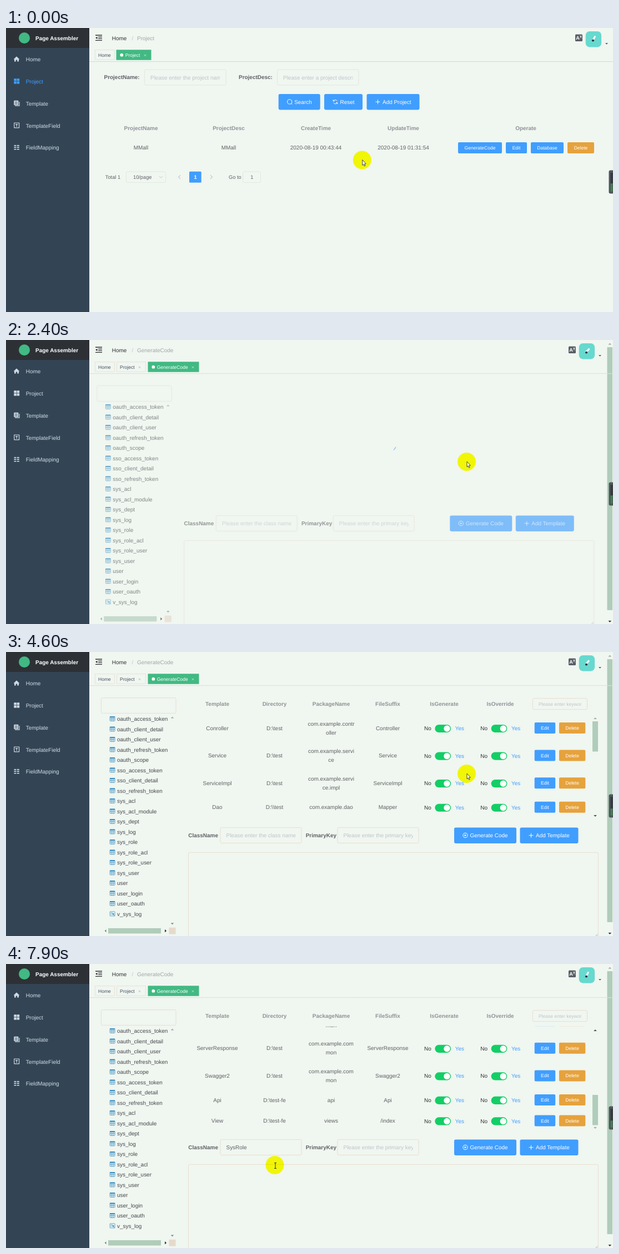
An HTML page with a canvas that plays this animation: 1093 px wide and 512 px high, repeating every 8000 ms.

```html
<!DOCTYPE html>
<html lang="en">
<head>
<meta charset="utf-8">
<title>Project admin</title>
<style>
html, body { margin: 0; width: 100%; height: 100%; overflow: hidden; background: #f0f6f0; }
canvas { display: block; width: 1093px; height: 512px; }
</style>
</head>
<body>
<canvas id="stage" width="1093" height="512"></canvas>
<script>
const ctx = document.getElementById('stage').getContext('2d');
ctx.textRendering = 'geometricPrecision';
const LOOP = 8000, LEAVE = 1715, SWAP = 2215, LOADED = 3740, PICKED = 7100;
const BG = '#f0f6f0', BLUE = '#409eff', GREEN = '#42b983', ORANGE = '#e6a23c';
const DARK = '#303133', TEXT = '#606266', MUTED = '#909399', HINT = '#c0c4cc';
const THUMB = '#b0ccba', SAND = '#e6dacb';
const SCROLL_MAX = 383.2, NOTCH = 71.16;
const NOTCH_TIMES = [4800, 5050, 5450, 5600, 5750, 5900];
const TABLES = ('oauth_access_token oauth_client_detail oauth_client_user oauth_refresh_token ' +
  'oauth_scope sso_access_token sso_client_detail sso_refresh_token sys_acl sys_acl_module ' +
  'sys_dept sys_log sys_role sys_role_acl sys_role_user sys_user user user_login user_oauth ' +
  'v_sys_log').split(' ');
const ROWS = [
  ['Conroller', 'D:\\test', 'com.example.contr|oller', 'Controller'],
  ['Service', 'D:\\test', 'com.example.servi|ce', 'Service'],
  ['ServiceImpl', 'D:\\test', 'com.example.servi|ce.impl', 'ServiceImpl'],
  ['Dao', 'D:\\\\test', 'com.example.dao', 'Mapper'],
  ['Mapper', 'D:\\test', 'mappers', 'Mapper'],
  ['Pojo', 'D:\\test', 'com.example.pojo', 'Pojo'],
  ['PojoDTO', 'D:\\test', 'com.example.dto', 'DTO'],
  ['ExceptionResolver', 'D:\\test', 'com.example.com|mon', 'ExceptionResolver'],
  ['ResponseCode', 'D:\\test', 'com.example.com|mon', 'ResponseCode'],
  ['ServerResponse', 'D:\\test', 'com.example.com|mon', 'ServerResponse'],
  ['Swagger2', 'D:\\test', 'com.example.com|mon', 'Swagger2'],
  ['Api', 'D:\\test-fe', 'api', 'Api'],
  ['View', 'D:\\test-fe', 'views', '/index']
];
const COLUMNS = [380.5, 483.5, 585.5, 687.5];
const PATH = [
  [0, 641.3, 238], [300, 641.3, 238], [1400, 829.5, 219.4], [6100, 829.5, 219.4], [6500, 488.4, 281.3],
  [6900, 236, 341], [7300, 236, 341], [7800, 484, 362.5], [8000, 484, 362.5]
];

const clamp = (v, lo = 0, hi = 1) => Math.min(hi, Math.max(lo, v));
const mix = (a, b, p) => a + (b - a) * p;
const smooth = p => p * p * (3 - 2 * p);

// CSS "ease": cubic-bezier(.25, .1, .25, 1)
function ease(p) {
  p = clamp(p);
  let lo = 0, hi = 1;
  for (let i = 0; i < 20; i++) {
    const u = (lo + hi) / 2;
    const x = 0.75 * u * (1 - u) + u ** 3;
    if (x < p) lo = u; else hi = u;
  }
  return 0.3 * lo * (1 - lo) ** 2 + 3 * lo * lo * (1 - lo) + lo ** 3;
}

function text(str, x, y, { color = TEXT, size = 9.96, bold = false, align = 'left' } = {}) {
  ctx.font = `${bold ? 'bold ' : ''}${size}px "Liberation Sans", Arial, sans-serif`;
  ctx.textAlign = align;
  ctx.fillStyle = color;
  ctx.fillText(str, x, y + size * 0.36);
}
const centered = (str, x, y, opts) => text(str, x, y, { align: 'center', ...opts });

function rect(x, y, w, h, color, r = 0) {
  ctx.fillStyle = color;
  ctx.beginPath();
  ctx.roundRect(x, y, w, h, r);
  ctx.fill();
}
function outline(x, y, w, h, color, r = 2.5) {
  ctx.strokeStyle = color;
  ctx.lineWidth = 0.8;
  ctx.beginPath();
  ctx.roundRect(x + 0.5, y + 0.5, w - 1, h - 1, r);
  ctx.stroke();
}
function circle(x, y, r, color) {
  ctx.fillStyle = color;
  ctx.beginPath();
  ctx.arc(x, y, r, 0, Math.PI * 2);
  ctx.fill();
}
// Each argument after the width is a polyline: [x, y, x, y, ...]
function strokes(color, width, ...lines) {
  ctx.strokeStyle = color;
  ctx.lineWidth = width;
  ctx.beginPath();
  for (const p of lines)
    for (let i = 0; i < p.length; i += 2) ctx[i ? 'lineTo' : 'moveTo'](p[i], p[i + 1]);
  ctx.stroke();
}
function polygon(color, ...p) {
  ctx.fillStyle = color;
  ctx.beginPath();
  for (let i = 0; i < p.length; i += 2) ctx.lineTo(p[i], p[i + 1]);
  ctx.closePath();
  ctx.fill();
}
const arrowY = (x, y, dir, color) => polygon(color, x - 2.8, y - dir * 1.5, x + 2.8, y - dir * 1.5, x, y + dir * 1.5);
const arrowX = (x, y, dir, color) => polygon(color, x - dir * 1.5, y - 2.8, x - dir * 1.5, y + 2.8, x + dir * 1.5, y);

function layer(alpha, dx, draw) {
  if (alpha <= 0) return;
  ctx.save();
  ctx.globalAlpha *= alpha;
  ctx.translate(dx, 0);
  draw();
  ctx.restore();
}
function clipped(x, y, w, h, draw) {
  ctx.save();
  ctx.beginPath();
  ctx.rect(x, y, w, h);
  ctx.clip();
  draw();
  ctx.restore();
}
function field(x, y, w, h, line, value, { color = HINT, size, pad = 11 } = {}) {
  outline(x, y, w, h, line);
  if (value) clipped(x + pad, y, w - 2 * pad, h, () => text(value, x + pad, y + h / 2, { color, size }));
}
function smallButton(label, x, y, w, color) {
  rect(x, y - 10, w, 20, color, 2);
  centered(label, x + w / 2, y, { color: '#fff', size: 8.54 });
}
function bigButton(label, x, y, w, icon) {
  rect(x, y - 14.2, w, 28.4, BLUE, 2.8);
  const cx = x + 20;
  ctx.strokeStyle = '#fff';
  if (icon === 'plus') strokes('#fff', 1, [cx - 4, y, cx + 4, y], [cx, y - 4, cx, y + 4]);
  else if (icon === 'reset') {
    ctx.lineWidth = 1;
    for (const a of [0.5, 3.64]) {
      ctx.beginPath();
      ctx.arc(cx, y, 3.6, a, a + 2.2);
      ctx.stroke();
    }
    strokes('#fff', 1, [cx - 3.8, y - 4, cx - 3.8, y - 1.4, cx - 1.2, y - 1.4], [cx + 3.8, y + 4, cx + 3.8, y + 1.4, cx + 1.2, y + 1.4]);
  } else {
    ctx.lineWidth = 1;
    ctx.beginPath();
    ctx.arc(cx, y - 0.2, 4.1, 0, Math.PI * 2);
    ctx.stroke();
    if (icon === 'search') strokes('#fff', 1, [cx + 2.8, y + 2.8, cx + 4.6, y + 4.6]);
    else polygon('#fff', cx - 1.3, y - 2.2, cx + 2.2, y - 0.2, cx - 1.3, y + 1.8);
  }
  text(label, x + 28.5, y, { color: '#fff' });
}

function drawSidebar(t) {
  rect(0, 0, 150, 512, '#334555');
  rect(0, 0, 150, 36, '#2d3136');
  circle(33, 18, 10, GREEN);
  text('Page Assembler', 53, 18, { color: '#fff', bold: true });
  const items = ['Home', 'Project', 'Template', 'TemplateField', 'FieldMapping'];
  items.forEach((label, i) => {
    const y = 56.7 + i * 39.8;
    const color = i === 1 && t < 1900 ? BLUE : '#d0dae4';
    text(label, 35.7, y, { color });
    drawMenuIcon(i, y - 0.7, color);
  });
}
function drawMenuIcon(i, y, color) {
  if (i === 0) {
    polygon(color, 13.5, y + 0.5, 19, y - 4.8, 24.5, y + 0.5, 23, y + 0.5, 23, y + 4.5, 20.3, y + 4.5,
      20.3, y + 1.5, 17.7, y + 1.5, 17.7, y + 4.5, 15, y + 4.5, 15, y + 0.5);
  } else if (i === 1) {
    for (const x of [14.3, 19.6]) for (const dy of [-4.6, 0.5]) rect(x, y + dy, 4.6, 4.3, color);
  } else if (i === 2) {
    rect(14.3, y - 4.8, 8, 8.2, color, 0.8);
    strokes(color, 1.2, [16, y + 4.6, 24, y + 4.6, 24, y - 2.5]);
    strokes('#334555', 0.8, [16, y - 2.5, 20.6, y - 2.5], [16, y - 0.5, 20.6, y - 0.5], [16, y + 1.5, 20.6, y + 1.5]);
  } else if (i === 3) {
    ctx.strokeStyle = color;
    ctx.lineWidth = 1.2;
    ctx.strokeRect(14.8, y - 4.4, 8.8, 8.8);
    strokes(color, 1.2, [17, y - 1.8, 21.4, y - 1.8], [19.2, y - 1.8, 19.2, y + 2.5]);
  } else {
    for (const dy of [-3.4, 0, 3.4]) strokes(color, 1.7, [14.5, y + dy, 18.3, y + dy], [19.7, y + dy, 23.8, y + dy]);
  }
}

function tab(label, x, w, active, line, closable) {
  if (active) {
    rect(x - 0.5, 39.2, w, 18.5, GREEN);
    circle(x + 9.3, 48.7, 2.9, '#fff');
  } else outline(x, 39, w, 18.5, line === SAND ? '#e6ded0' : '#d8e3da', 0);
  text(label, x + (active ? 15.7 : 6), 48.7, { color: active ? '#fff' : '#495060', size: 8.54 });
  if (closable) {
    const cx = x + w - 11.5, color = active ? '#d8f0e5' : '#a9afb0';
    strokes(color, 0.8, [cx - 1.5, 47.7, cx + 1.5, 50.7], [cx + 1.5, 47.7, cx - 1.5, 50.7]);
  }
}
function drawHeader(t, line) {
  strokes(DARK, 1.3, [161, 13, 173, 13], [166, 16.2, 173, 16.2], [166, 19.2, 173, 19.2], [161, 22.3, 173, 22.3]);
  polygon(DARK, 161, 17.7, 164.5, 15.4, 164.5, 20);
  text('Home', 190.8, 18, { color: DARK });
  text('/', 226.5, 18, { color: HINT });
  const p = ease((t - LEAVE) / 500), crumb = { color: '#a0a8a8' };
  if (t < LEAVE) text('Project', 236, 18, crumb);
  else {
    layer(1 - p, mix(255.5, 269.7, p), () => {
      text('Project', 0, 18, crumb);
      text('/', 40, 18, crumb);
    });
    layer(clamp(p * 1.4 - 0.4), mix(14.2, 0, p), () => text('GenerateCode', 236, 18, crumb));
  }

  tab('Home', 160, 36, false, line);
  if (t < LEAVE) tab('Project', 199, 63, true, line, true);
  else {
    tab('Project', 199, 53, false, line, t > 1850);
    tab('GenerateCode', 256, 92, true, line, true);
  }
  strokes(t < LEAVE ? '#c9dfd0' : '#e8dccb', 1, [150, 60.5, 1093, 60.5]);

  layer(1, t < SWAP ? 0 : -12, () => {
    rect(1025, 11.5, 13, 12.5, '#5a5e66', 1.5);
    text('A', 1026.3, 18, { color: '#fff', size: 9, bold: true });
    strokes('#fff', 0.7, [1033, 14.5, 1037, 14.5], [1036.2, 14.5, 1033.2, 18.5], [1033.8, 14.5, 1036.8, 18.5]);
    rect(1043.7, 6, 28.4, 28.4, '#67d9cf', 7);
    drawAvatarFigure(t);
    polygon(TEXT, 1079, 27, 1084, 27, 1081.5, 29.7);
  });
}
function drawAvatarFigure(t) {
  ctx.save();
  ctx.translate(1058, 20);
  ctx.rotate(0.5 + 0.45 * Math.sin(t / 180));
  ctx.lineCap = 'round';
  strokes('#f4fbfa', 3.2, [0, -5, 0, 2.5]);
  ctx.restore();
  circle(1057, 22.5, 2.1, '#26383b');
}

function drawProjectPage(line, hover) {
  text('ProjectName:', 176.5, 88.7, { bold: true });
  field(249, 74.5, 147.5, 29, line, 'Please enter the project name');
  text('ProjectDesc:', 419, 88.7, { bold: true });
  field(488, 74.5, 147.5, 29, line, 'Please enter a project description');
  bigButton('Search', 490.7, 133.2, 75, 'search');
  bigButton('Reset', 573, 133.2, 69, 'reset');
  bigButton('Add Project', 649.5, 133.2, 95, 'plus');

  const columns = [[243, 'ProjectName', 'MMall'], [401, 'ProjectDesc', 'MMall'],
    [558, 'CreateTime', '2020-08-19 00:43:44'], [715.5, 'UpdateTime', '2020-08-19 01:31:54'], [936, 'Operate', '']];
  for (const [x, head, value] of columns) {
    centered(head, x, 180.5, { color: MUTED, bold: true });
    centered(value, x, 215.7);
  }
  smallButton('GenerateCode', 814, 216, 79, hover ? '#66b1ff' : BLUE);
  smallButton('Edit', 900, 216, 38, BLUE);
  smallButton('Database', 945, 216, 59, BLUE);
  smallButton('Delete', 1011, 216, 48, ORANGE);

  const small = { size: 9.25 };
  text('Total 1', 178.8, 268.7, small);
  outline(216, 258.5, 72, 20.5, line);
  text('10/page', 229, 268.7, small);
  strokes(HINT, 0.9, [276, 267.3, 279, 270, 282, 267.3]);
  strokes(HINT, 1.1, [314, 265.3, 310.6, 268.7, 314, 272.1], [368, 265.3, 371.4, 268.7, 368, 272.1]);
  rect(330, 258.7, 21.7, 20, BLUE, 1.5);
  centered('1', 341, 268.7, { ...small, color: '#fff', bold: true });
  text('Go to', 401, 268.7, small);
  outline(426, 258.5, 33, 20.5, line);
  centered('1', 442.7, 268.7, small);
}

function drawTree(line) {
  field(171, 82, 135.5, 29, line);
  TABLES.forEach((name, i) => {
    const y = 120.7 + i * 18.5;
    text(name, 200, y, { color: '#45484d' });
    outline(186.7, y - 4.7, 9.8, 8.8, '#3a8ec0', 0.5);
    if (i < 19) {
      rect(187, y - 4.5, 9, 2, '#3a8ec0');
      strokes('#3a8ec0', 0.8, [187, y, 196, y], [190, y - 3, 190, y + 4], [193, y - 3, 193, y + 4]);
    } else {
      strokes('#3a8ec0', 0.8, [188.5, y - 2, 192, y - 2], [188.5, y + 0.5, 191, y + 0.5], [193, y + 1, 196, y + 4]);
      circle(193, y, 1.5, '#3a8ec0');
    }
  });
  arrowY(299.5, 118, -1, '#a3a9a5');
  arrowY(299.5, 490, 1, '#858a86');
  arrowX(179, 502.7, -1, '#858a86');
  arrowX(287.5, 502.7, 1, DARK);
  rect(184, 498, 95, 9.5, THUMB);
  rect(293.5, 496.8, 12, 11.8, SAND);
}

function toggle(x, y) {
  text('No', x, y + 0.5, { color: DARK });
  rect(x + 19.3, y - 6.1, 28.8, 14.2, '#13ce66', 7.1);
  circle(x + 41, y + 1, 5.7, '#fff');
  text('Yes', x + 55.8, y + 0.5, { color: BLUE });
}
function drawTemplates(t, line, scroll) {
  const heads = ['Template', 'Directory', 'PackageName', 'FileSuffix', 'IsGenerate', 'IsOverride'];
  heads.forEach((h, i) => centered(h, COLUMNS[i] || [789, 890][i - 4], 93.3, { color: MUTED, bold: true }));
  field(948, 83, 99, 21, line, 'Please enter keyword', { size: 8.54 });
  clipped(320, 112.5, 735, 188.8, () => {
    let top = 112.2 - scroll;
    for (const row of ROWS) {
      const lines = row[2].split('|'), h = lines.length > 1 ? 49.6 : 37.5, y = top + h / 2;
      top += h;
      if (y < 80 || y > 330) continue;
      row.forEach((cell, i) => {
        if (i !== 2) centered(cell, COLUMNS[i], y);
      });
      lines.forEach((s, k) => centered(s, COLUMNS[2], y + (k - (lines.length - 1) / 2) * 16));
      toggle(753, y);
      toggle(854.3, y);
      smallButton('Edit', 951.7, y, 37.5, BLUE);
      smallButton('Delete', 996, y, 47.3, ORANGE);
    }
  });
  arrowY(1061, 119.5, -1, scroll > 0 ? '#4c504d' : '#a3a9a5');
  arrowY(1061, 295.5, 1, scroll < SCROLL_MAX ? '#4c504d' : '#a3a9a5');
  rect(1056, 125 + scroll / SCROLL_MAX * 111, 10, 54.5, t < 4100 ? '#d8c4b3' : THUMB);
}

function drawSpinner(t) {
  const p = ((t - 2260 + 3000) % 1500) / 1500;
  const half = smooth((p * 2) % 1);
  const offset = p < 0.5 ? 40 * half : 40 + 80 * half;
  const length = p < 0.5 ? 1 + 89 * half : 90;
  const unit = Math.PI * 2 / 125.6;
  const spin = (85 + (t - 2800) * 0.18) * Math.PI / 180;
  ctx.strokeStyle = BLUE;
  ctx.lineWidth = 1.3;
  ctx.lineCap = 'round';
  ctx.beginPath();
  ctx.arc(698, 188.5, 12.3, spin + offset * unit, spin + Math.min(125.6, offset + length) * unit);
  ctx.stroke();
}

function drawGeneratePage(t, line) {
  drawTree(line);
  const shown = clamp((t - LOADED) / 300);
  const scroll = Math.min(SCROLL_MAX, NOTCH_TIMES.reduce((s, at) => s + NOTCH * smooth(clamp((t - at) / 150)), 0));
  layer(shown, 0, () => drawTemplates(t, line, scroll));
  layer((1 - shown) ** 2, 0, () => drawSpinner(t));

  text('ClassName', 328.3, 330.7, { bold: true });
  const picked = t >= PICKED;
  field(385.5, 316, 147, 29, line, picked ? 'SysRole' : 'Please enter the class name', { color: picked ? TEXT : HINT });
  text('PrimaryKey', 539.7, 330.7, { bold: true });
  field(596.5, 316, 147, 29, line, 'Please enter the primary key');
  bigButton('Generate Code', 807, 330.7, 112, 'play');
  bigButton('Add Template', 925.5, 330.7, 105, 'plus');
  outline(328, 361, 739, 153, line);
  strokes('#a9aeaa', 0.7, [1061.5, 512, 1065.5, 508], [1063.5, 512, 1065.5, 510]);
}

function drawCursor(t, x, y) {
  ctx.save();
  ctx.globalCompositeOperation = 'multiply';
  circle(x, y, 16.5, '#ffff06');
  ctx.restore();
  ctx.lineJoin = 'round';
  const hand = (t > 1300 && t < 1950) || (t >= 6900 && t <= 7350);
  if (t >= 7700) {
    strokes(DARK, 1, [x - 1, y - 4, x + 3, y - 4], [x + 1, y - 4, x + 1, y + 6], [x - 1, y + 6, x + 3, y + 6]);
    return;
  }
  const shape = hand
    ? [-1, 0, 0.6, 0, 0.8, 4.4, 5.5, 5.5, 5.8, 9, 4.4, 12.5, -0.6, 12.5, -3.6, 8, -3, 6.8, -1, 8]
    : [0.5, -0.3, 0.5, 9.5, 2.5, 7.6, 4, 11, 5.6, 10.3, 4.1, 7, 6.9, 6.8];
  const points = shape.map((v, i) => v + (i % 2 ? y : x));
  polygon('#fff', ...points);
  strokes('#333', 0.9, [...points, points[0], points[1]]);
}

function drawRecorder(t) {
  rect(1085.5, 256.5, 12, 42, '#50565c', 3);
  rect(1088.5, 261, 4, 33, '#33393d');
  const level = 13 + 2 * Math.sin(t / 130);
  for (let y = 294; y > 294 - level; y -= 2) rect(1088.5, y - 1.4, 4, 1.4, '#509a60');
}

function pointer(t) {
  const i = PATH.findIndex((k, n) => n && t <= k[0]);
  const a = PATH[i - 1], b = PATH[i];
  const p = smooth((t - a[0]) / (b[0] - a[0]));
  return [mix(a[1], b[1], p), mix(a[2], b[2], p)];
}

function render(t) {
  rect(0, 0, 1093, 512, BG);
  const line = t < LEAVE ? '#dbe6dc' : SAND;
  const [x, y] = pointer(t);
  if (t < SWAP) {
    const p = ease((t - LEAVE) / 500);
    const hover = x > 814 && y < 226;
    layer(1 - p, 21.3 * p, () => drawProjectPage(line, hover));
  } else {
    const p = ease((t - SWAP) / 500);
    layer(p, -21.3 * (1 - p), () => drawGeneratePage(t, line));
    rect(1082.5, 13, 9.5, 474, THUMB);
    arrowY(1087.3, 7, -1, '#a3a9a5');
    arrowY(1087.3, 507.5, 1, DARK);
  }
  drawSidebar(t);
  drawHeader(t, line);
  drawRecorder(t);
  drawCursor(t, x, y);
}

const start = performance.now();
function tick() {
  const t = (performance.now() - start) % LOOP;
  render(Math.floor(t / 100) * 100);
  requestAnimationFrame(tick);
}
tick();
</script>
</body>
</html>
```
